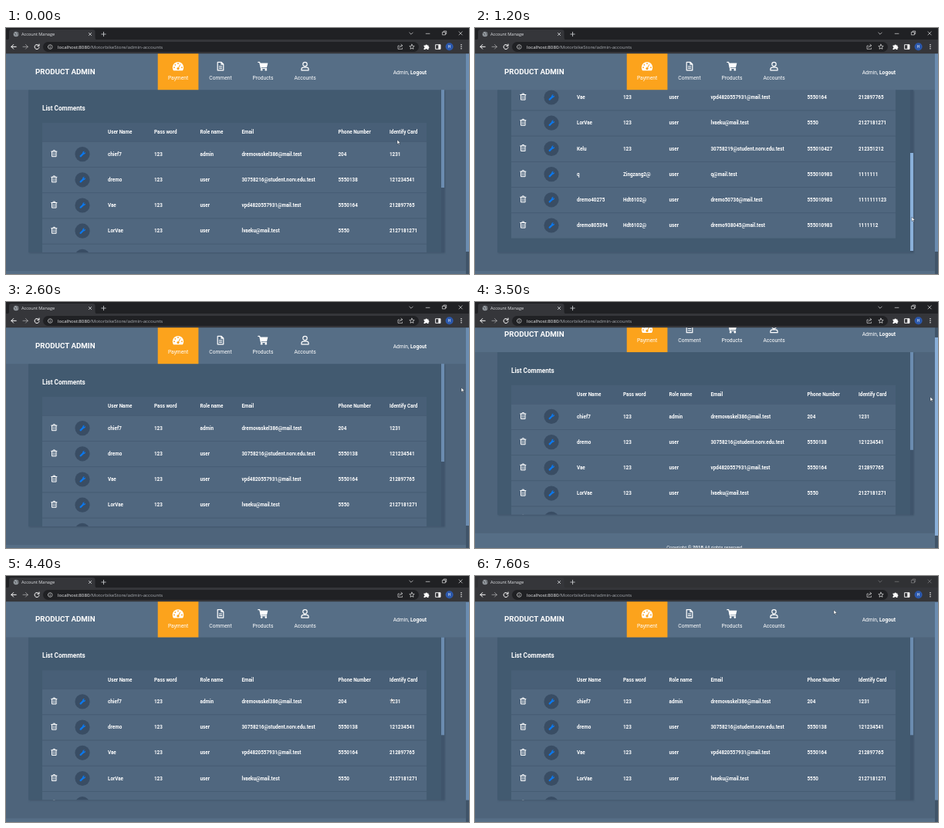
Animation, 600 px wide and 319 px high, one loop 7700 ms. Source, as an HTML page:

```html
<!DOCTYPE html>
<html lang="en">
<head>
<meta charset="utf-8">
<title>Account Manage</title>
<style>
html, body { margin: 0; width: 100%; height: 100%; overflow: hidden; background: #4e647b; }
svg { display: block; width: 600px; height: 319px; font-family: Roboto, sans-serif; fill: #fff; }
.line { fill: none; stroke: #fff; stroke-linecap: round; stroke-linejoin: round; }
.ui { font-family: "Open Sans", sans-serif; }
.bold { font-weight: 700; }
.mid { text-anchor: middle; }
</style>
</head>
<body>
<svg id="stage" viewBox="0 0 600 319"></svg>
<script>
const LOOP = 7700, STEP = 100;
const ROW_H = 33.2, LIST_MAX = 140, LIST_TRAVEL = 82;
const PAGE_MAX = 34, PAGE_TRAVEL = 29;
const THUMB = '#6b8cb0', THUMB_ACTIVE = '#8ab0da', ORANGE = '#fca31c';

const columns = [132, 192, 251.5, 305.5, 430.5, 497];
const headings = ['User Name', 'Pass word', 'Role name', 'Email', 'Phone Number', 'Identify Card'];
const accounts = [
  ['chief7', '123', 'admin', 'dremovaskel386@mail.test', '204', '1231'],
  ['dremo', '123', 'user', '30758216@student.norv.edu.test', '5550138', '121234541'],
  ['Vae', '123', 'user', 'vpd4820557931@mail.test', '5550164', '212897765'],
  ['LorVae', '123', 'user', 'lvaeku@mail.test', '5550', '2127181271'],
  ['Kelu', '123', 'user', '30758219@student.norv.edu.test', '555010427', '212351212'],
  ['q', 'Zingzang2@', 'user', 'q@mail.test', '555010983', '1111111'],
  ['dremo40275', 'Hdt6102@', 'user', 'dremo50736@mail.test', '555010983', '1111111123'],
  ['dremo805394', 'Hdt6102@', 'user', 'dremo938045@mail.test', '555010983', '1111112']
];

const rect = (x, y, w, h, fill, extra = '') =>
  `<rect x="${x}" y="${y}" width="${w}" height="${h}" fill="${fill}" ${extra}/>`;
const text = (x, y, size, str, extra = '') =>
  `<text x="${x}" y="${y}" font-size="${size}" ${extra}>${str}</text>`;
const line = (d, width, extra = '') =>
  `<path class="line" d="${d}" stroke-width="${width}" ${extra}/>`;
const dot = (x, y, r, fill = 'inherit') => `<circle cx="${x}" cy="${y}" r="${r}" fill="${fill}"/>`;
const at = (x, y, body) => `<g transform="translate(${x} ${y})">${body}</g>`;

const trash = line('M-3.6-2.7H3.6M-1.6-2.9L-1-4.1H1L1.6-2.9M-2.8-2.4V3.9H2.8V-2.4', 1) +
  line('M-1-.8V2.4M1-.8V2.4', .7);
const wrench = dot(0, 0, 9.6, '#394d64') +
  '<path d="M-3.5 2.2L.1-1.3Q-.1-3.2 1.8-3.8L2.8-3.8L1.7-2.3L2.4-1.5L3.9-2.5Q4.2.1 1.6.4L-1.9 3.8Q-3.5 4-3.5 2.2z" fill="#0b78ee"/>';

function accountRow(cells, i) {
  const top = 147 + i * ROW_H, mid = top + 16.4;
  return rect(47, top, 498, ROW_H, '#50677f') +
    rect(47, top, 498, .8, '#455b72') +
    at(62.3, mid - .6, trash) + at(99, mid + .2, wrench) +
    cells.map((cell, c) => text(columns[c], mid + 2.4, 6.3, cell, 'class="bold"')).join('');
}

const gauge = '<path d="M-6 5.6Q-7.2 3.8-7.2 1.5A7.2 7.2 0 0 1 7.2 1.5Q7.2 3.8 6 5.6z"/>' +
  [[-5, 1.6], [-3.7, -1.8], [0, -3.6], [5, 1.6]].map(([x, y]) => dot(x, y, .9, ORANGE)).join('') +
  line('M.2 2.8L2.7-2', 1, `style="stroke:${ORANGE}"`) + dot(0, 3, 1.6, ORANGE);
const page = line('M-3.8-5.2H1.2L3.8-2.6V5.2H-3.8zM1-5V-2.4H3.6', 1.2) +
  line('M-1.7.1H1.7M-1.7 2.5H1.7', 1.1);
const cart = '<path d="M-4.2-4.2H6.4L5 1.5H-3z"/>' +
  line('M-6.2-5.2H-4.3L-2.5 2.8H4.6', 1.2, 'style="stroke:inherit"') +
  dot(-1.8, 4.7, 1.3) + dot(3.8, 4.7, 1.3);
const person = line('M-2.7-2.6A2.7 2.7 0 1 0 2.7-2.6A2.7 2.7 0 1 0-2.7-2.6zM-4.6 5.2V3.9Q-4.6 1.5-2 1.5H2Q4.6 1.5 4.6 3.9V5.2z', 1.2);

const navItem = (x, icon, label, extra = '') =>
  `<g ${extra}>` + at(x, 49.6, icon) + text(x, 67.4, 6.7, label, 'class="mid"') + '</g>';

const nav = rect(0, 33, 596, 47.2, '#566e86') + rect(196.7, 33, 52.7, 47.2, ORANGE) +
  text(38, 60.2, 9.75, 'PRODUCT ADMIN', 'class="bold"') +
  navItem(223, gauge, 'Payment') + navItem(278, page, 'Comment') +
  navItem(333, cart, 'Products', 'id="products" stroke-width="0"') + navItem(387.5, person, 'Accounts') +
  text(501.7, 59.6, 6.7, 'Admin, <tspan class="bold">Logout</tspan>');

const list = rect(29, 80, 539, 211, '#435a70', 'filter="url(#soft)"') +
  '<g clip-path="url(#listClip)"><g id="list">' +
  text(47, 106.9, 8.2, 'List Comments', 'class="bold"') +
  rect(47, 123, 498, 24.5, '#485f77') +
  headings.map((h, c) => text(columns[c], 137.3, 6.3, h, 'class="bold"')).join('') +
  accounts.map(accountRow).join('') + '</g></g>' +
  rect(564, 80, 4, 211, '#3f546b') + rect(564, 80, 4, 127, THUMB, 'id="listThumb"');

const footer = rect(0, 315, 596, 40, '#566e86') +
  text(298, 335.4, 6.1, 'Copyright © <tspan class="bold">2018</tspan> All rights reserved.', 'class="mid"');

const browser = rect(0, 0, 600, 15.5, '#202124', 'id="frame"') +
  '<path d="M1 15.5Q4 15.5 4 12.5V5Q4 2 7 2H112Q115.5 2 115.5 5V12.5Q115.5 15.5 118.5 15.5z" fill="#35363a"/>' +
  rect(0, 15, 600, 18.2, '#35363a') + rect(48, 18, 487, 13, '#202124', 'rx="6.5"') +
  dot(13, 8, 3.3, '#9aa0a6') +
  line('M10.5 6.5L12.5 7.5L12 9.5M14 5.5L15.5 8L14 9.5', .8, 'style="stroke:#46484c"') +
  text(20, 10.1, 5.55, 'Account Manage', 'class="ui" fill="#e4e6e9"') +
  line('M107.3 6.3L110.7 9.7M110.7 6.3L107.3 9.7M123.8 8H129.2M126.5 5.3V10.7', .8, 'style="stroke:#d5d7da"') +
  line('M522.8 6L525 8.2L527.2 6M544.2 7.3H549M565.8 5.3H569.4V8.9H565.8zM567.1 5.1V4H570.7V7.6H569.5M587 4.8L591.2 9M591.2 4.8L587 9', .65, 'id="controls"') +
  line('M13.2 24.3H7M9.7 21.5L6.9 24.3L9.7 27.1', 1) +
  line('M22 24.3H28.2M25.5 21.5L28.3 24.3L25.5 27.1', 1, 'opacity=".45"') +
  line('M42.5 22.7A3 3 0 1 0 43 25.2M43 21V23.3H40.7', 1) +
  line('M54.4 24.5A2.8 2.8 0 1 0 60 24.5A2.8 2.8 0 1 0 54.4 24.5M57.2 24.3V26M57.2 22.8V23', .7, 'opacity=".8"') +
  text(67, 26.7, 6.15, 'localhost:8080<tspan fill="#aaaeb4">/MotorbikeStore/admin-accounts</tspan>', 'class="ui" fill="#f0f1f3"') +
  line('M509.5 23H508V27.3H513.5V26M509.8 25.3Q510.2 22.7 513.4 22.7M512 21.2L513.8 22.7L512 24.2', .7, 'opacity=".8"') +
  line('M526 21.2L526.9 23.3L529.2 23.5L527.5 25L528 27.3L526 26.1L524 27.3L524.5 25L522.8 23.5L525.1 23.3z', .7, 'opacity=".85"') +
  '<path d="M541.5 22.5H543.5A1.3 1.3 0 0 1 546 22.5H547.5V24A1.3 1.3 0 0 1 547.5 26.5V28H545.8A1.3 1.3 0 0 0 543.3 28H541.5V26.4A1.3 1.3 0 0 0 541.5 23.9z"/>' +
  line('M557 21.7H563V27.3H557z', .9) + rect(560.3, 21.7, 2.7, 5.6, '#fff') +
  dot(574.6, 24.3, 5, '#2b58ac') + text(574.6, 26.2, 5, 'H', 'class="mid"') +
  [21.8, 24.3, 26.8].map(y => dot(590, y, .75)).join('');

const stage = document.getElementById('stage');
stage.innerHTML = `<defs>
  <clipPath id="listClip"><rect x="29" y="80" width="535" height="211"/></clipPath>
  <filter id="soft" x="-5%" y="-5%" width="110%" height="110%">
    <feDropShadow dx="1" dy="1" stdDeviation="1.3" flood-color="#41556b"/></filter></defs>` +
  rect(0, 0, 600, 319, '#4e647b') +
  `<g id="page">${list}${nav}${footer}</g>` +
  rect(596, 33, 4, 286, '#405469') + rect(596, 33, 4, 257, THUMB, 'id="pageThumb"') + browser +
  '<path id="cursor" d="M0 0V5.6L1.4 4.4L2.3 6.3L3.1 5.9L2.3 4.1H4z" stroke="#1b2430" stroke-width=".4"/>';
const el = id => document.getElementById(id);

// Each track is a list of [time, ...values], eased between neighbours.
function sample(track, t) {
  const next = track.findIndex(k => k[0] > t);
  if (next < 0) return track[track.length - 1].slice(1);
  const a = track[Math.max(0, next - 1)], b = track[next];
  const p = Math.min(1, Math.max(0, (t - a[0]) / (b[0] - a[0] || 1)));
  const e = p * p * (3 - 2 * p);
  return a.slice(1).map((v, i) => v + (b[i + 1] - v) * e);
}

const listTrack = [[0, 0], [850, 0], [1150, 1], [1700, 1], [2100, 0]];
const pageTrack = [[0, 0], [3310, 0], [3720, PAGE_MAX], [3800, PAGE_MAX], [4050, .7]];
const cursorTrack = [
  [0, 507, 145], [200, 507, 145], [750, 566, 163], [850, 566, 163], [1150, 566, 245],
  [1700, 566, 245], [2100, 566, 163], [2600, 590, 111], [3310, 590, 111], [3720, 590, 138],
  [3800, 590, 138], [4050, 590, 112], [4400, 499, 158], [4900, 499, 158], [5300, 335, 52],
  [5500, 334, 50], [5700, 333, 26], [6000, 400, 10], [6400, 509, 22], [6700, 510, 23],
  [6800, 510, 23], [7200, 465, 44]
];

function render(t) {
  const [listPos] = sample(listTrack, t), [scroll] = sample(pageTrack, t);
  const [x, y] = sample(cursorTrack, t);
  const shift = (id, dx, dy) => el(id).setAttribute('transform', `translate(${dx} ${dy})`);
  const within = (from, to) => t >= from && t < to;

  shift('list', 0, -listPos * LIST_MAX);
  shift('listThumb', 0, listPos * LIST_TRAVEL);
  shift('page', 0, -scroll);
  shift('pageThumb', 0, scroll / PAGE_MAX * PAGE_TRAVEL);
  shift('cursor', x, y);
  el('listThumb').setAttribute('fill', within(700, 2200) ? THUMB_ACTIVE : THUMB);
  el('pageThumb').setAttribute('fill', within(3100, 4100) ? THUMB_ACTIVE : THUMB);

  const hover = within(5200, 6900) ? ORANGE : '#fff';
  el('products').setAttribute('fill', hover);
  el('products').setAttribute('stroke', hover);

  const inactive = t >= 7400;
  el('frame').setAttribute('fill', inactive ? '#303134' : '#202124');
  el('controls').setAttribute('opacity', inactive ? .4 : .9);
}

function tick(now) {
  render(Math.floor(now % LOOP / STEP) * STEP);
  requestAnimationFrame(tick);
}
render(0);
requestAnimationFrame(tick);
</script>
</body>
</html>
```
